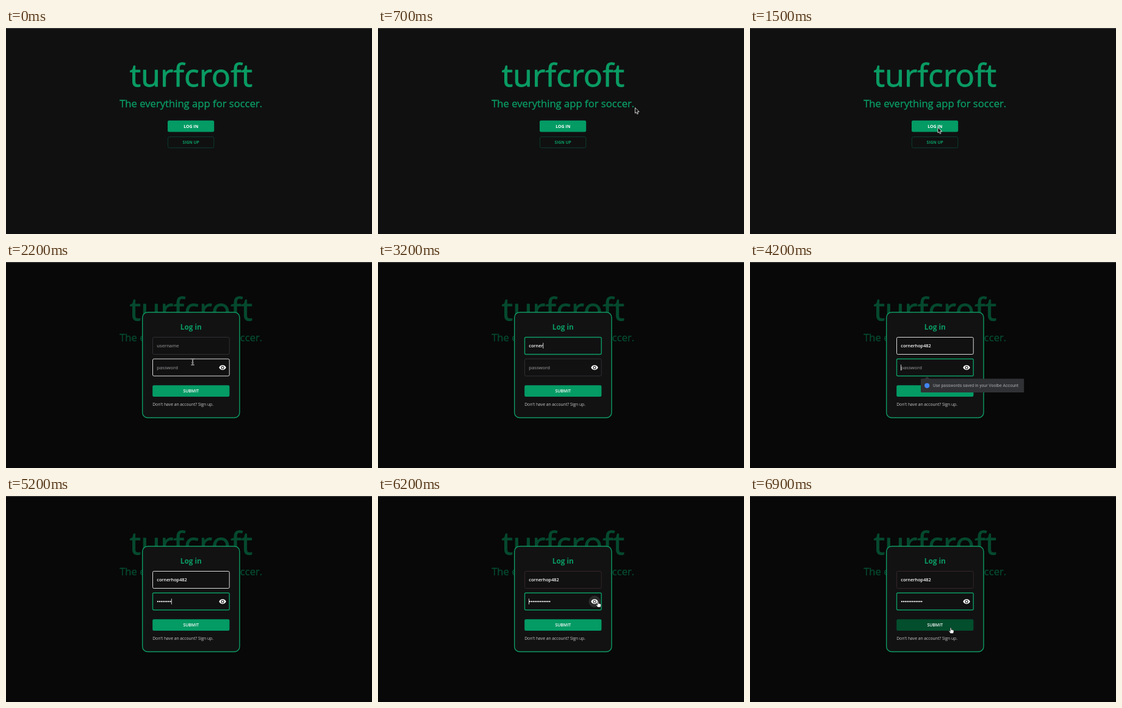
Recreate the animation shown at these times as an HTML page. Size 600 by 338 pixels, loop 7 s.

```html
<!DOCTYPE html>
<html lang="en">
<head>
<meta charset="utf-8">
<title>Log in</title>
<style>
  html, body { margin: 0; width: 100%; height: 100%; overflow: hidden; background: #101011; }
  svg { display: block; width: 100vw; height: 100vh; }
  text { font-family: "Open Sans", "Noto Sans", sans-serif; fill: #0a9b63; }
  .mid { text-anchor: middle; }
  .bold { font-weight: 700; }
  .semi { font-weight: 600; }
  .thick { stroke: #0a9b63; stroke-linejoin: round; }
  text.white { fill: #fff; }
  text.hint { fill: #8a8a8c; font-size: 7.7px; stroke: #8a8a8c; stroke-width: .12; }
  .field { fill: #111112; rx: 2px; }
</style>
</head>
<body>
<svg viewBox="0 0 600 338">
  <rect width="600" height="338" fill="#101011"/>

  <text class="mid thick" x="303.5" y="96" font-size="52" stroke-width=".9">turfcroft</text>
  <text class="mid thick" x="303.2" y="130.3" font-size="16.65" stroke-width=".35">The everything app for soccer.</text>
  <rect x="265" y="151.8" width="76.2" height="18.8" rx="2.4" fill="#049b65"/>
  <text class="mid bold white" x="303.3" y="163.6" font-size="6.9">LOG IN</text>
  <rect x="265.4" y="178.6" width="75.4" height="18" rx="2.2" fill="none" stroke="#0c4a34" stroke-width=".8"/>
  <text class="mid bold" x="303.2" y="190.2" font-size="6.7">SIGN UP</text>

  <g id="dialog">
    <rect width="600" height="338" fill="#000" opacity=".53"/>
    <rect x="223.7" y="82.5" width="159.3" height="173" rx="8.5" fill="#121213" stroke="#0d9b63" stroke-width="1.4"/>
    <text class="mid bold" x="303.3" y="111.3" font-size="11.8">Log in</text>

    <rect id="userBox" class="field" x="240.5" y="123.5" width="125.7" height="28"/>
    <text id="userHint" class="hint" x="247.3" y="140.2">username</text>
    <text id="userText" class="semi white" x="247.3" y="140.2" font-size="7.3"></text>

    <rect id="passBox" class="field" x="240.5" y="159" width="125.7" height="28"/>
    <text id="passHint" class="hint" x="247.3" y="175.8">password</text>
    <g id="dots" fill="#fff"></g>
    <circle id="eyeHover" cx="355" cy="173.2" r="9.6" fill="#2b2b2c"/>
    <path transform="translate(348.8 167) scale(.52)" fill="#fff" d="M12 4.5C7 4.5 2.7 7.6 1 12c1.7 4.4 6 7.5 11 7.5s9.3-3.1 11-7.5c-1.7-4.4-6-7.5-11-7.5zM12 17a5 5 0 1 1 0-10 5 5 0 0 1 0 10zm0-8a3 3 0 1 0 0 6 3 3 0 0 0 0-6z"/>

    <rect id="submit" x="240.2" y="202.3" width="126.2" height="18.6" rx="2.2"/>
    <text class="mid semi white" x="303.3" y="214.2" font-size="6.9">SUBMIT</text>
    <text x="240.2" y="236.4" font-size="6.76" style="fill:#c8c8c9">Don't have an account? Sign up.</text>
    <rect id="caret" width=".8" height="9.4" fill="#fff"/>
  </g>

  <g id="popup">
    <path d="M285.5 192.5l4.8-4.6 4.8 4.6z" fill="#303134"/>
    <rect x="280" y="191.6" width="169.2" height="22.3" rx="1.2" fill="#303134"/>
    <circle cx="290.2" cy="202.8" r="4.1" fill="#4285f4"/>
    <text x="300" y="205.4" font-size="6.95" style="font-family:Roboto,sans-serif;fill:#a5a8ac">Use passwords saved in your Voolbe Account</text>
  </g>

  <g id="pointer" stroke-linejoin="round" stroke-linecap="round">
    <path id="arrow" d="M0 0v8.6l2-1.8 1.4 3.2 1.6-.7-1.4-3.1h2.7z" fill="#000" stroke="#fff" stroke-width=".8"/>
    <g id="beam" fill="none">
      <path d="M-2-4.7Q0-4.7 0-3.5Q0-4.7 2-4.7M0-3.5v7M-2 4.7Q0 4.7 0 3.5Q0 4.7 2 4.7M-1 1.2h2" stroke="#ddd" stroke-width="1.6"/>
      <path d="M-2-4.7Q0-4.7 0-3.5Q0-4.7 2-4.7M0-3.5v7M-2 4.7Q0 4.7 0 3.5Q0 4.7 2 4.7M-1 1.2h2" stroke="#222" stroke-width=".6"/>
    </g>
    <path id="hand" d="M-.9 1Q-.9 0 0 0T.9 1v2.5q.8-.7 1.5.2.8-.5 1.4.4 1-.3 1.2.8v2.3L4 9.6H-.2L-2.7 6.3q-.7-1.3.2-1.4l1.6 1.2z" fill="#fff" stroke="#111" stroke-width=".6"/>
  </g>

  <rect width="600" height="1.2" fill="#3d3d3f"/>
</svg>

<script>
const LOOP = 7000, STEP = 100;
const USER = "cornerhop482";
const GREEN = "#0d9b63", DIM = "#39393b", WHITE = "#dcdcdc", BROWN = "#402d2d";
const el = id => document.getElementById(id);
const set = (id, attrs) => {
  for (const key in attrs) el(id).setAttribute(key, attrs[key]);
};
const show = (id, on) => { el(id).style.display = on ? "" : "none"; };
const clamp = (v, lo, hi) => Math.min(hi, Math.max(lo, v));
const within = (t, from, to) => t >= from && t < to;
const typed = (t, start) => clamp((t - start) / STEP + 1, 0, USER.length);

// time, x, y
const route = [
  [100, 198, 284], [400, 330, 240], [800, 452, 95], [900, 450, 115],
  [1100, 330, 64], [1300, 208, 130], [1400, 265, 190], [1500, 308, 163.5],
  [1700, 308, 163.5], [1900, 306, 164], [2200, 306, 164], [2400, 305, 140],
  [5700, 305, 140], [6000, 352, 171], [6200, 360.5, 173],
  [6400, 360.5, 173], [6700, 332, 212], [6900, 329, 216]
];

for (let i = 0; i < USER.length; i++) {
  const dot = document.createElementNS("http://www.w3.org/2000/svg", "circle");
  dot.setAttribute("cx", 248.8 + i * 2.96);
  dot.setAttribute("cy", 173.2);
  dot.setAttribute("r", 1.1);
  el("dots").append(dot);
}

function pointerAt(t) {
  const next = route.findIndex(p => p[0] > t);
  if (next < 0) return route.at(-1).slice(1);
  const [t0, x0, y0] = route[Math.max(0, next - 1)];
  const [t1, x1, y1] = route[next];
  const k = t1 > t0 ? clamp((t - t0) / (t1 - t0), 0, 1) : 0;
  return [x0 + (x1 - x0) * k, y0 + (y1 - y0) * k];
}

function border(id, color) {
  set(id, { stroke: color, "stroke-width": color === GREEN ? 1.4 : color === WHITE ? 1 : 0.8 });
}

function drawPointer(t) {
  const [x, y] = pointerAt(t);
  const onEye = Math.hypot(x - 355, y - 173) < 10;
  const onSubmit = y > 202;
  const kind = t < 1800 ? "arrow" : t < 2700 ? "beam"
    : onEye || onSubmit ? "hand" : y < 187 ? "beam" : "arrow";
  show("pointer", within(t, 100, 2700) || t >= 5700);
  set("pointer", { transform: `translate(${x} ${y})` });
  for (const id of ["arrow", "beam", "hand"]) show(id, id === kind);
  show("eyeHover", t >= 5700 && onEye);
}

function drawForm(t) {
  const letters = typed(t, 2700);
  const dots = t < 4800 ? clamp((t - 4300) / STEP, 0, 4) : clamp(4 + (t - 4800) / STEP, 4, 12);
  const inUser = within(t, 2500, 4000), inPass = t >= 4000;

  el("userText").textContent = USER.slice(0, letters);
  show("userHint", !letters);
  show("passHint", !dots);
  [...el("dots").children].forEach((dot, i) => { dot.style.display = i < dots ? "" : "none"; });

  border("userBox", inUser ? GREEN : t < 2400 ? DIM : t < 5800 ? WHITE : BROWN);
  border("passBox", inPass ? GREEN : within(t, 1700, 2400) ? WHITE : DIM);

  const typing = inUser ? el("userText").getComputedTextLength() : t < 5900 ? dots * 2.96 : 0;
  set("caret", { x: 247.2 + typing, y: inUser ? 132.6 : 168.4 });
  show("caret", inUser || within(t, 4000, 6500));

  const hover = clamp((t - 6500) / 300, 0, 1);
  const mix = (a, b) => Math.round(a + (b - a) * hover);
  set("submit", { fill: `rgb(${mix(4, 3)},${mix(155, 78)},${mix(101, 45)})` });
}

function draw(now) {
  const t = Math.floor((now % LOOP) / STEP) * STEP;
  show("dialog", t >= 1700);
  el("dialog").style.opacity = clamp(0.4 + (t - 1700) / 220, 0, 1);
  show("popup", within(t, 4000, 4400));
  drawForm(t);
  drawPointer(t);
}

const start = performance.now();
function tick() {
  draw(performance.now() - start);
  requestAnimationFrame(tick);
}
tick();
</script>
</body>
</html>
```
